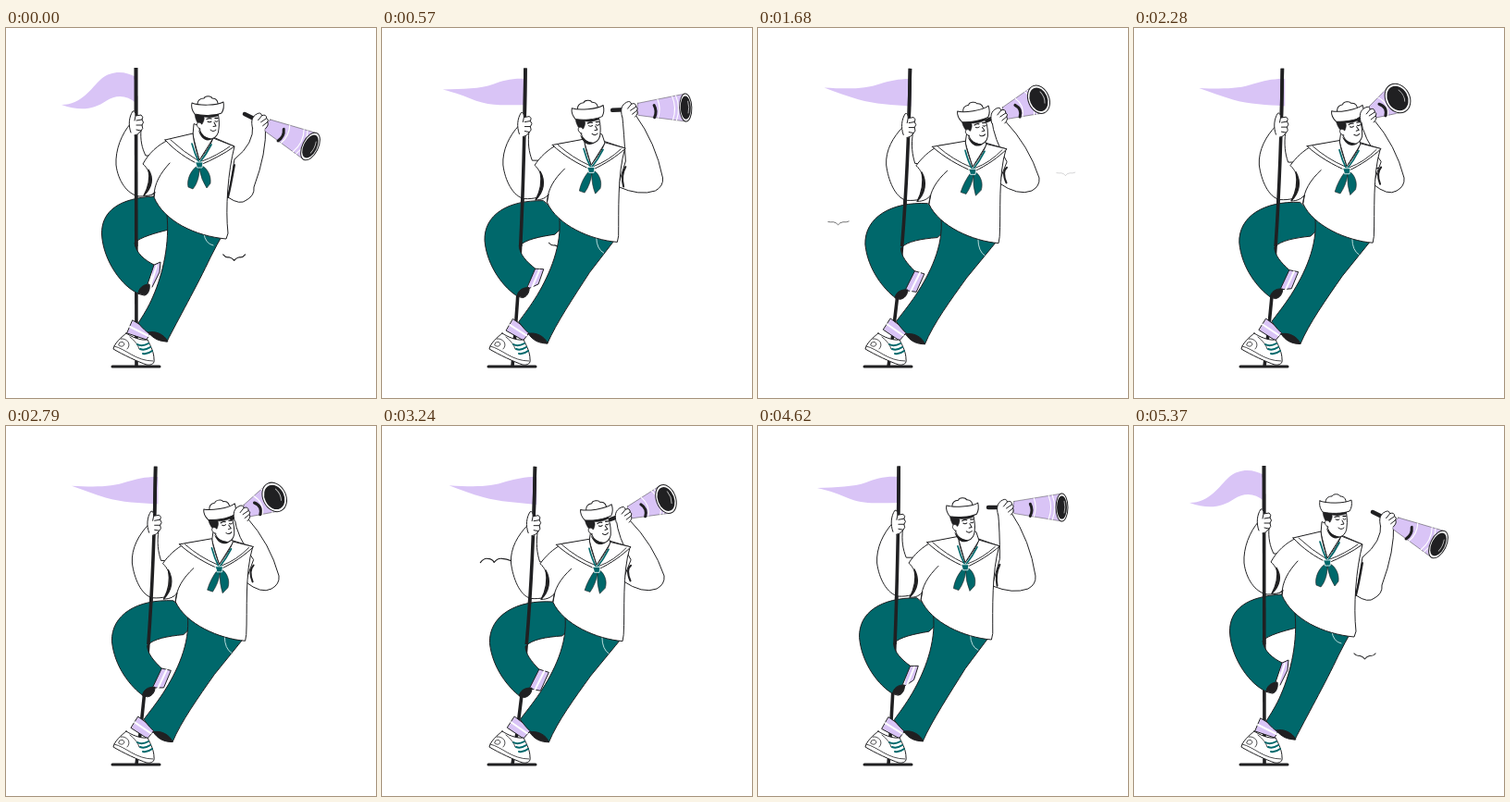
An HTML page that plays this animation: 400x400 px, repeating every 5.4 s.

```html
<!DOCTYPE html>
<html lang="en">
<head>
<meta charset="utf-8">
<title>Sailor with a spyglass</title>
<style>
html, body { margin: 0; width: 100%; height: 100%; overflow: hidden; background: #fff; }
svg { display: block; width: 100vw; height: 100vh; }
path, ellipse { stroke-linecap: round; stroke-linejoin: round; }
.pole { stroke-linecap: butt; }
</style>
</head>
<body>
<svg id="stage" viewBox="0 0 400 400">
  <clipPath id="above"><rect width="400" height="236"/></clipPath>
</svg>
<script>
const LOOP = 5400;
const INK = '#202022', TEAL = '#00686b', LILAC = '#d9c4f6', WHITE = '#fff';
const stage = document.getElementById('stage');

function add(tag, attrs, parent = stage) {
  const el = document.createElementNS('http://www.w3.org/2000/svg', tag);
  for (const name in attrs) el.setAttribute(name, attrs[name]);
  return parent.appendChild(el);
}
const shape = (fill, width = 1, parent = stage, stroke = INK) =>
  add('path', { fill, stroke: width ? stroke : 'none', 'stroke-width': width }, parent);

// Blend two paths that share the same commands.
const NUM = /-?\d+(\.\d+)?/g;
function mix(a, b, k) {
  const to = b.match(NUM);
  let i = 0;
  return a.replace(NUM, n => (+n + (to[i++] - n) * k).toFixed(2));
}

// Paths from upright to leaning; "by" names the driving pose value.
const morphs = [];
function morph(by, upright, leaning, fill, width, stroke) {
  const el = shape(fill, width, stage, stroke);
  morphs.push({ el, by, upright, leaning });
  return el;
}

// Pose: pole, body, flag, head x y turn, eyepiece x y, lens x y rx ry, elbow x y
const NAMES = ['pole', 'body', 'flag', 'hx', 'hy', 'turn', 'ex', 'ey', 'lx', 'ly', 'rx', 'ry', 'ax', 'ay'];
const rest   = [0, 0, 0, 218, 85, 0, 258, 93, 329, 128, 8.5, 16, 266, 178];
const level  = [.42, .6, 1, 221, 89, -3, 249, 88, 328.5, 88, 6.5, 15, 298, 168];
const right  = [1, 1, 2, 235, 92, -7, 252, 101, 325, 80, 8.5, 15, 314, 168];
const front  = [.71, .84, 1.7, 231, 91, -9, 243, 99, 285, 76, 13, 16.5, 290, 168];
const sweep  = [.89, .92, 1.95, 232, 92, -8, 247, 101, 307, 79, 10.5, 16, 303, 168];
const far    = [1, 1, 2, 235, 92, -6, 252, 100, 328, 79.5, 7, 15, 316, 167];
const keys = [[0, rest], [480, level], [1080, right], [2280, front], [2520, front],
  [3240, sweep], [4020, far], [4620, level], [5280, rest], [LOOP, rest]];

// Monotone cubic through the keys.
function tangent(i, c) {
  if (i === 0 || i === keys.length - 1) return 0;
  const [p, q, r] = [keys[i - 1], keys[i], keys[i + 1]];
  const s = (q[1][c] - p[1][c]) / (q[0] - p[0]);
  const e = (r[1][c] - q[1][c]) / (r[0] - q[0]);
  return s * e > 0 ? 2 * s * e / (s + e) : 0;
}
function poseAt(t) {
  let i = 0;
  while (i < keys.length - 2 && t >= keys[i + 1][0]) i++;
  const [t0, a] = keys[i], [t1, b] = keys[i + 1];
  const d = t1 - t0, u = (t - t0) / d, v = 1 - u, pose = {};
  NAMES.forEach((name, c) => {
    pose[name] = a[c] * v * v * (1 + 2 * u) + b[c] * u * u * (3 - 2 * u)
      + d * u * v * (tangent(i, c) * v - tangent(i + 1, c) * u);
  });
  return pose;
}

// Birds
const birds = [
  { start: 5250, x: 261, dx: -190, y: 252, dy: -45, size: .92 },
  { start: 1650, x: 337, dx: -269, y: 158, dy: -16, size: 1 }
].map(b => ({ ...b, el: shape('none', 1.2) }));
const WINGS_UP = 'M-13 -4 Q-10 0 -6 -1 Q-2 0 0 3 Q2 0 6 -1 Q10 0 13 -4';
const WINGS_DOWN = 'M-17 3 Q-13 -3 -9 -2 Q-4 -2 -2 2 Q2 -3 7 -2 Q12 -2 17 1';

function drawBird(b, t) {
  const u = ((t - b.start + LOOP) % LOOP) / 2000;
  b.el.style.display = u < 1 ? '' : 'none';
  if (u >= 1) return;
  const grow = Math.min(1, .6 + u * 6, (1 - u) * 10);
  b.el.setAttribute('d', mix(WINGS_UP, WINGS_DOWN, (1 - Math.cos(t * Math.PI / 300)) / 2));
  b.el.setAttribute('transform', `translate(${b.x + b.dx * u} ${b.y + b.dy * u}) scale(${b.size * grow})`);
  b.el.setAttribute('opacity', Math.min(1, u / .07, (1 - u) * 8));
}

// Flag, pole and base
const FLAGS = [
  'M140.5 53 C130 47 115 45 103 55 C92 65 82 83 60 83 C82 91 96 87 108 79 C120 71 131 73 140.5 81 Z',
  'M152 55 C138 54 127 57 117 61 C103 66 85 66 64 67 C78 70 88 74 100 79 C116 85 134 83 152 83 Z',
  'M168 55 C155 55 146 57 135 60 C118 66 100 66 73 64 C85 69 97 73 110 77 C128 82 148 83 168 85 Z'
];
const flag = shape(LILAC, 0);
const POLE = ['M140.5 43 Q140.5 230 141 366', 'M168.5 44 Q165 230 141 366'];
morph('pole', ...POLE, 'none', 3.6).setAttribute('class', 'pole');
shape('none', 3).setAttribute('d', 'M115 366 H166');

// Bent leg
morph('pole', 'M158 257 L167 253 L166 264 L158 280 L150 278 Z',
  'M169 263 L182 268 L172 289 L158 284 Z', LILAC, 1);
morph('pole', 'M163 257 L156 279', 'M177 266 L166 287', 'none', 2, WHITE);
morph('pole',
  'M160 182 C122 184 103 198 103.5 223 C105 252 126 280 143 287 C148 287 152 281 153 277 L160 256 C150 251 140 243 139 232 C146 226 160 222 176 218 L190 205 Z',
  'M187 191 C148 188 117 206 118 236 C121 263 138 283 150 293 C155 292 159 287 161 283 L171 264 C163 255 157 247 157 239 C164 231 180 229 197 228 L212 214 Z', TEAL, 1);
morph('pole', 'M143 287 C143 282 148 277 155 277 C156 282 154 288 150 289 Z',
  'M149 292 C150 287 155 283 163 284 C163 289 159 294 154 294 Z', INK, 1);

// Standing leg and shoe
morph('body', 'M137 316 L157 328 L152 337 L131 330 Z', 'M144 314 L162 328 L153 338 L136 326 Z', LILAC, 1);
morph('body', 'M134 323 L154 333', 'M140 320 L157 332', 'none', 2, WHITE);
shape(WHITE).setAttribute('d', 'M130 330 C125 334 117 341 116 347 C126 353 143 361 152 364 C158 365 161 362 160 358 C160 351 157 345 153 337 C145 338 136 334 130 330 Z');
shape('none', .8).setAttribute('d', 'M117 344 C130 347 140 360 159 360 M124 336 C131 335 136 342 131 347 M123 340 q4 -2 5 2 q-2 4 -6 1 z M134 334 Q142 340 144 347');
shape('none', 2, stage, TEAL).setAttribute('d', 'M142 342 Q147 345 154 341 M145 347 Q150 349 156 345 M148 352 Q153 353 158 349');
morph('body',
  'M174 202 C177 232 170 265 159 290 C154 302 148 311 143 319 C151 329 162 337 174 339 C185 317 207 278 221 248 Q228 234 235 222 Z',
  'M200 206 C203 236 187 266 172 288 C163 301 156 309 150 317 C158 329 169 339 181 342 C190 320 208 296 226 272 Q247 247 262 229 Z', TEAL, 1);
morph('body', 'M154 329 C161 327 171 331 175 339 C166 339 159 336 154 329 Z',
  'M160 331 C168 329 178 334 181 342 C172 342 165 339 160 331 Z', INK, 1);
morph('body', 'M214 222 Q215 233 224 235', 'M240 229 Q240 242 247 247', 'none', 1, '#b9dcdc');

// Pole arm
morph('pole',
  'M135 103 C125 114 118 132 119 148 C121 165 131 180 144 182 C153 182 160 180 172 174 L162 138 L151 138 C147 130 145 121 146 110 Z',
  'M160 108 C150 118 141 132 142 148 C144 164 151 184 163 187 C174 188 183 186 198 178 L186 148 L173 148 C170 138 169 128 171 114 Z', WHITE, 1);
const arm = shape(WHITE);

// Shirt
morph('body',
  'M176 121 C164 126 154 136 148 147 C157 155 160 169 149 181 C155 182 159 180 161 177 L160 183 C171 209 205 225 238 228 L240 222 C237 195 240 155 247 128 L224 118 L202 115 Z',
  'M197 128 C187 133 178 142 173 149 C183 158 184 174 174 188 C181 188 186 185 189 181 L187 191 C198 215 235 231 262 233 L263 226 C265 200 261 160 270 131 L249 125 L226 124 Z', WHITE, 1);
morph('body', 'M160 182 C160 168 167 157 177 146', 'M187 191 C188 177 195 166 207 155', 'none', 1);
morph('body', 'M154 153 C160 162 158 173 149 181 C154 172 156 163 154 153 Z',
  'M179 156 C185 167 183 179 174 188 C180 177 181 167 179 156 Z', INK, 1.2);
const cuff = shape('none', 2);

// Neck, collar and scarf
morph('body', 'M203 104 L202 116 L209 143 L224 119 L221 110 Z', 'M228 112 L226 125 L234 151 L249 127 L246 118 Z', WHITE, 1);
morph('body',
  'M172 121 L202 114 C203 124 206 134 209 143 C214 136 221 128 224 119 L247 128 C236 136 222 143 210 148 C196 142 182 132 172 121 Z',
  'M190 129 L226 123 C227 132 231 142 234 151 C239 144 246 135 249 126 L271 131 C262 140 250 149 235 156 C220 150 202 140 190 129 Z', WHITE, 1);
morph('body', 'M178 121 Q192 134 207 143 M242 128 Q228 138 212 144',
  'M196 129 Q212 143 232 151 M266 132 Q253 146 237 152', 'none', .9);
morph('body', 'M201 125 Q204 136 209 146 Q217 136 222 126', 'M226 133 Q229 145 234 154 Q242 144 247 134', 'none', 1.7, TEAL);
morph('body',
  'M207 149 C200 153 195 164 197 172 L202 174 C207 168 209 160 209 152 Q211 164 217 173 L221 168 C222 160 218 152 212 149 Z',
  'M232 157 C228 163 224 170 221 178 L227 180 C231 174 234 167 235 160 Q234 172 237 182 L243 176 C246 168 242 160 238 157 Z', TEAL, .6);
morph('body', 'M205 145 L213 145 L212 151 L207 151 Z', 'M230 153 L238 153 L237 159 L232 159 Z', TEAL, .8, WHITE);

// Pole passes in front of the arm and thigh, under the hand.
const upper = morph('pole', ...POLE, 'none', 3.6);
upper.setAttribute('clip-path', 'url(#above)');
upper.setAttribute('class', 'pole');
const grip = shape(WHITE);
grip.setAttribute('d', 'M-5 11 C-8 3 -7 -6 -3 -12 Q0 -13 0 -7 L6 -8 Q9 -6 7 -3 Q10 0 7 3 Q9 7 6 9 Q3 14 -1 14 M0 -7 L-1 -2 M1 -2 L7 -3 M1 3 L7 3 M1 8 L6 9');

// Head
const head = add('g', {});
for (const [fill, width, d] of [
  [WHITE, 1, 'M-12 6 L-9 24 C-7 31 -2 35 4 35 C9 34 12 29 12 24 C13 18 12 11 11 6 Z'],
  [INK, 0, 'M-10 25 C-8 34 -2 39 5 35 C-1 34 -6 31 -10 25 Z'],
  [INK, .5, 'M-14 6 C-6 9 4 10 12 7 L11 10 C5 12 1 12 -4 11 C-3 14 -5 17 -6 19 L-10 19 C-13 15 -14 10 -14 6 Z'],
  [WHITE, .9, 'M-7 18 C-12 14 -14 22 -8 24'],
  ['none', 1, 'M0 16 q2 1.6 4 0 M8 15.5 q1.5 1.5 3 0 M7 17 L9 21 L6 21.5 M3 25 Q6 28 9 25'],
  ['none', 1.3, 'M-1 13.5 Q2 12 4 13 M8 12.5 L11 12.5'],
  [WHITE, 1, 'M-11 1 C-12 -8 -7 -9 -4 -9 C-3 -12 4 -12 5 -9 C10 -9 12 -5 11 1 Z'],
  [WHITE, 1, 'M-17 -4 C-10 -1 10 -1 17 -5 C18 0 17 4 15 7 C7 10 -6 10 -14 8 C-17 4 -18 0 -17 -4 Z']
]) shape(fill, width, head).setAttribute('d', d);

// Spyglass, laid out along x from the eyepiece
const glass = add('g', {});
const tube = shape('none', 4.5, glass);
const cone = shape(LILAC, .4, glass);
const rims = shape('none', 1.1, glass, WHITE);
const band = shape('none', 3, glass);
const rim = add('ellipse', { fill: WHITE, stroke: INK, 'stroke-width': 1 }, glass);
const hole = add('ellipse', { fill: INK }, glass);
const glint = shape('none', .9, glass, '#bbb');
const hold = shape(WHITE);
hold.setAttribute('d', 'M-7 8 C-9 0 -8 -5 -2 -8 Q2 -10 3 -6 Q8 -8 8 -3 Q11 -2 9 1 Q11 4 7 8 M3 -6 L-1 -1 M8 -3 L2 1 M9 1 L4 5');

function drawGlass(p) {
  const dx = p.lx - p.ex, dy = p.ly - p.ey, len = Math.hypot(dx, dy), r = p.ry;
  glass.setAttribute('transform', `translate(${p.ex} ${p.ey}) rotate(${Math.atan2(dy, dx) * 180 / Math.PI})`);
  const half = u => 2 + (r - 2) * u;
  const ring = (u, from = -1) => {
    const h = half(u), x = len * u;
    return `M${x} ${h * from} Q${x + p.rx * u * .9} ${h * (from + 1) / 2} ${x} ${h}`;
  };
  const near = len * .35, h = half(.35);
  tube.setAttribute('d', `M0 0 H${near}`);
  cone.setAttribute('d', `M${near} ${-h} L${len} ${-r} V${r} L${near} ${h} Q${near - p.rx * .4} 0 ${near} ${-h} Z`);
  rims.setAttribute('d', ring(.62) + ring(.82) + ring(.87));
  band.setAttribute('d', ring(.57, -.4));
  for (const [el, k] of [[rim, 1], [hole, .84]]) {
    el.setAttribute('cx', len);
    el.setAttribute('rx', p.rx * k);
    el.setAttribute('ry', r * k);
  }
  glint.setAttribute('d', `M${len + p.rx * .4} ${-r * .45} Q${len + p.rx * .65} 0 ${len + p.rx * .4} ${r * .4}`);
}

function drawArm(p) {
  const hx = p.ex + (p.lx - p.ex) * .22, hy = p.ey + (p.ly - p.ey) * .22;
  const sx = 246 + 24 * p.body, sy = 128 + 3 * p.body;
  const px = 240 + 22 * p.body, py = 183 - 17 * p.body;
  const { ax, ay } = p;
  arm.setAttribute('d', `M${hx - 7} ${hy + 5} Q${hx - 5} ${hy + 24} ${sx + 1} ${sy + 14}
    L${px} ${py} Q${(px + ax) / 2} ${ay + 14} ${ax - 6} ${ay + 8}
    Q${ax + 3} ${ay + 3} ${ax + 2} ${ay - 6}
    Q${(ax + hx) / 2 + 12} ${(ay + hy) / 2 - 4} ${hx + 7} ${hy + 5} Z`);
  cuff.setAttribute('d', `M${sx + 1} ${sy + 20} Q${px + 3} ${py - 12} ${px + 9 * p.body} ${py}`);
  hold.setAttribute('transform', `translate(${hx} ${hy})`);
}

function render(t) {
  const p = poseAt(t);
  for (const m of morphs) m.el.setAttribute('d', mix(m.upright, m.leaning, p[m.by]));
  const i = p.flag < 1 ? 0 : 1;
  flag.setAttribute('d', mix(FLAGS[i], FLAGS[i + 1], p.flag - i));
  grip.setAttribute('transform', `translate(${140 + 26 * p.pole} ${102 + 3 * p.pole})`);
  head.setAttribute('transform', `translate(${p.hx} ${p.hy}) rotate(${p.turn})`);
  drawArm(p);
  drawGlass(p);
  for (const b of birds) drawBird(b, t);
}

const begin = performance.now();
function tick() {
  render((performance.now() - begin) % LOOP);
  requestAnimationFrame(tick);
}
tick();
</script>
</body>
</html>
```
